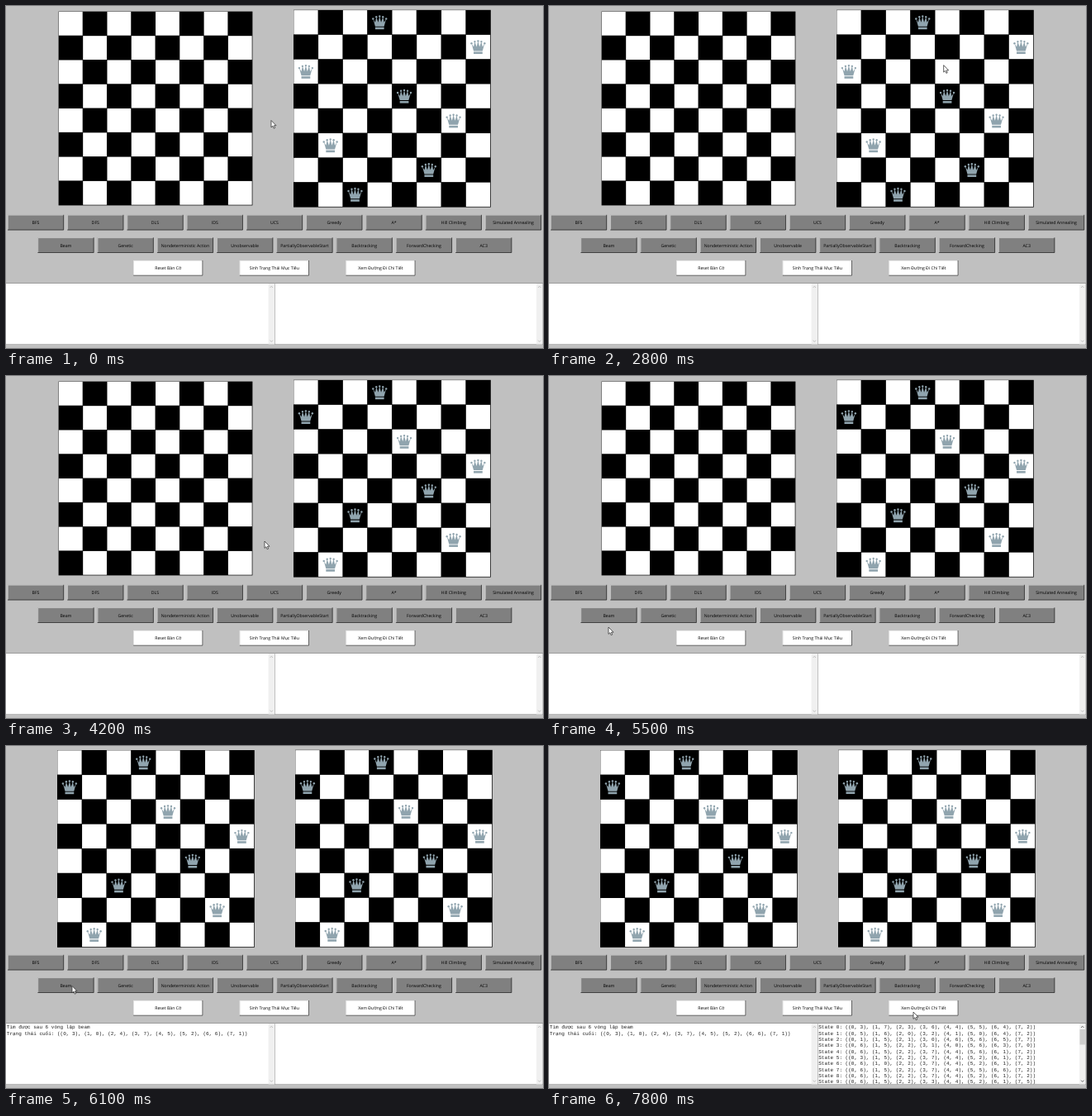
These frames come from a looping animation (650x414 px, 8000 ms). An HTML page:

```html
<!DOCTYPE html>
<html lang="vi">
<head>
<meta charset="utf-8">
<title>8 Queens</title>
<style>
  html, body { margin: 0; width: 100%; height: 100%; overflow: hidden; background: #c0c0c0; }
  svg { display: block; width: 650px; height: 414px; }
  text { text-rendering: geometricPrecision; white-space: pre; }
  .label { font: 5.2px "Open Sans", "Noto Sans", sans-serif; text-anchor: middle; }
  .mono { font: 6.01px "Liberation Mono", "DejaVu Sans Mono", monospace; fill: #222; }
</style>
</head>
<body>
<script>
const NS = 'http://www.w3.org/2000/svg';
const LOOP = 8000, STEP = 100;
const SOLUTION = '30475261', FIRST_GOAL = '37046152';

function add(parent, tag, attrs, text) {
  const el = document.createElementNS(NS, tag);
  for (const k in attrs) el.setAttribute(k, attrs[k]);
  if (text !== undefined) el.textContent = text;
  parent.appendChild(el);
  return el;
}
const rect = (p, x, y, width, height, fill) => add(p, 'rect', { x, y, width, height, fill });
const show = (el, on) => el.setAttribute('visibility', on ? 'visible' : 'hidden');

const svg = add(document.body, 'svg', { viewBox: '0 0 650 414', width: 650, height: 414 });
rect(svg, 0, 0, 650, 414, '#c0c0c0');

// Boards are built on a 240-unit square, 30 units per cell.
function makeBoard() {
  const g = add(svg, 'g', {});
  rect(g, 0, 0, 240.5, 240.5, '#000');
  for (let row = 0; row < 8; row++)
    for (let col = row % 2; col < 8; col += 2)
      rect(g, col * 30 + .3, row * 30 + .3, 29.5, 29.5, '#fff');
  return g;
}
const place = (g, x, y, size) =>
  g.setAttribute('transform', `translate(${x} ${y}) scale(${size / 240})`);

// Five balls on an arc, joined to the body by thin spikes.
const tips = [-2, -1, 0, 1, 2].map(i => [i * 4, -7.2 + i * i * .75]);
const crown = 'M' + tips.map(([x, y], i) => `${x} ${y}` + (i < 4 ? `L${(x + 2) * .9} 0` : ''))
  .join('L') + 'L5.4 5H-5.4Z';

function makeQueens(board, cols) {
  const g = add(board, 'g', { fill: '#90a4ae' });
  [...cols].forEach((c, row) => {
    const q = add(g, 'g', { transform: `translate(${c * 30 + 15} ${row * 30 + 15})` });
    add(q, 'path', { d: crown });
    rect(q, -5.4, 6, 10.8, 2.6, '#90a4ae');
    tips.forEach(([cx, cy]) => add(q, 'circle', { cx, cy, r: 1.2 }));
  });
  return g;
}

const left = makeBoard(), right = makeBoard();
const found = makeQueens(left, SOLUTION);
const oldGoal = makeQueens(right, FIRST_GOAL);
const newGoal = makeQueens(right, SOLUTION);

function makeButton(label, x, y, w, fill) {
  const h = 18.5, g = add(svg, 'g', {});
  rect(g, x, y, w, h, fill);
  const edge = d => add(g, 'path', { d, fill: 'none', 'stroke-width': .7 });
  const a = edge(`M${x + .3} ${y + h}V${y + .3}H${x + w}`);
  const b = edge(`M${x} ${y + h - .3}H${x + w - .3}V${y}`);
  add(g, 'text', { class: 'label', x: x + w / 2, y: y + 11.3 }, label);
  return down => {
    a.setAttribute('stroke', down ? '#222' : '#d8d8d8');
    b.setAttribute('stroke', down ? '#d8d8d8' : '#222');
  };
}
const row = (labels, x, y, pitch, w, fill) =>
  labels.split('|').map((s, i) => makeButton(s, x + i * pitch, y, w, fill));

const topRow = row('BFS|DFS|DLS|IDS|UCS|Greedy|A*|Hill Climbing|Simulated Annealing',
  2, 252.8, 72.25, 68, '#808080');
const midRow = row('Beam|Genetic|Nondeterministic Action|Unobservable|PartiallyObservableStart|' +
  'Backtracking|ForwardChecking|AC3', 38.4, 280.3, 72.25, 68, '#808080');
const lowRow = row('Reset Bàn Cờ|Sinh Trạng Thái Mục Tiêu|Xem Đường Đi Chi Tiết',
  154.2, 308, 128.6, 84, '#fff');
[...topRow, ...midRow, ...lowRow].forEach(press => press(false));
const [pressBeam] = midRow, [, pressGoal, pressDetail] = lowRow;

// Output panes
function makePane(x, w) {
  const g = add(svg, 'g', {}), bar = x + w - 8;
  rect(g, x, 335.3, w, 74.7, '#8c8c8c');
  rect(g, x, 336, w - .6, 73.4, '#fff');
  rect(g, bar, 336, 7.4, 73.4, '#f0f0f0');
  const arrows = add(g, 'path', {
    d: `M${bar + 2} 341l1.7-1.8l1.7 1.8M${bar + 2} 404.7l1.7 1.8l1.7-1.8`,
    fill: 'none', 'stroke-width': .9, stroke: '#bbb'
  });
  return { g, bar, arrows };
}
function makeLines(pane, x, lines) {
  const g = add(pane.g, 'g', {});
  lines.forEach((s, i) => add(g, 'text', { class: 'mono', x, y: 342.2 + i * 7.33 }, s));
  return g;
}
const state = cols => '(' + [...cols].map((c, i) => `(${i}, ${c})`).join(', ') + ')';

const paneL = makePane(0, 325.6), paneR = makePane(325.6, 324.4);
const result = makeLines(paneL, .8,
  ['Tìm được sau 6 vòng lặp beam', 'Trạng thái cuối: ' + state(SOLUTION)]);
const steps = makeLines(paneR, 326.2,
  ('37364542 56021042 15106657 65210630 65274612 ' +
   '35274212 60274212 65274562 65274212 65234215')
    .split(' ').map((s, i) => `State ${i}: ${state(s)}`));
rect(steps, paneR.bar + .5, 343, 6.4, 18.5, '#cdcdcd');

const cursor = add(svg, 'path', {
  d: 'M0 0V8.4L1.9 6.7L3.2 9.7L4.6 9.1L3.4 6.2H6Z',
  fill: '#fff', stroke: '#222', 'stroke-width': .7, 'stroke-linejoin': 'round'
});

// Pointer moves: start, end, x, y; it rests in between.
const home = [321, 138.5];
const moves = [
  [1800, 1900, 272, 127], [1900, 2100, 122, 92], [2100, 2300, 337, 124.5],
  [2400, 2500, 337, 175], [2600, 2900, 548, 20], [2900, 3300, 192, 318],
  [3300, 3500, 338, 316], [3800, 4200, 313, 200], [5000, 5500, 72, 304],
  [5500, 5700, 80, 290.5], [6700, 6800, 168, 301], [6800, 7400, 441, 322]
];
function pointer(t) {
  let [x, y] = home;
  for (const [from, to, tx, ty] of moves) {
    const k = Math.min(1, Math.max(0, (t - from) / (to - from)));
    x += (tx - x) * k;
    y += (ty - y) * k;
  }
  return [x, y];
}

function update(ms) {
  const t = Math.floor((ms % LOOP) / STEP) * STEP;
  const within = (a, b) => t >= a && t < b;
  const wide = t >= 6100;

  if (wide) place(left, 62, 5, 238.3); else place(left, 63.6, 6.6, 234.3);
  place(right, wide ? 350 : 348, 4.8, 238.3);
  show(oldGoal, t < 3700);
  show(newGoal, t >= 3700);
  show(found, t >= 6000);
  show(result, t >= 6000);
  show(steps, t >= 7600);
  paneR.arrows.setAttribute('stroke', t >= 7600 ? '#606060' : '#bbb');

  pressGoal(within(3600, 3700));
  pressBeam(within(5800, 6000));
  pressDetail(within(7500, 7600));
  cursor.setAttribute('transform', `translate(${pointer(t)})`);
}

const start = performance.now();
function tick() {
  update(performance.now() - start);
  requestAnimationFrame(tick);
}
tick();
</script>
</body>
</html>
```
